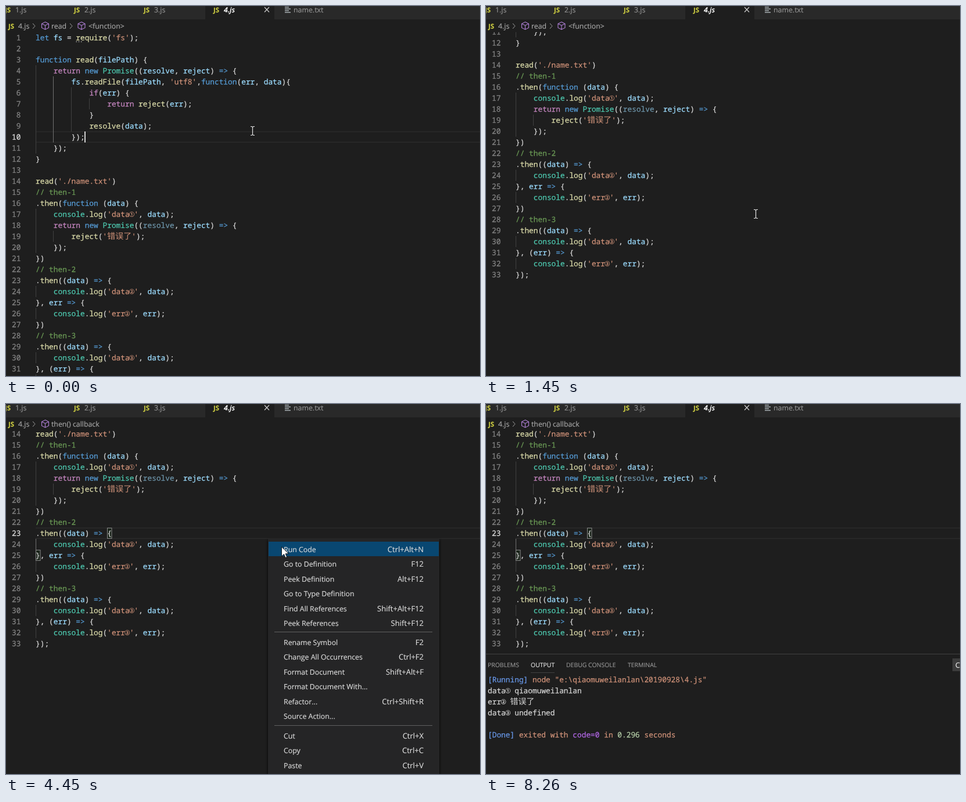
An HTML page for the animation above (8520 ms loop, 816 px wide and 637 px high).

```html
<!DOCTYPE html>
<html lang="en">
<head>
<meta charset="utf-8">
<title>Promise chain in an editor</title>
<style>
html, body { margin: 0; width: 100%; height: 100%; overflow: hidden; background: #1e1e1e; }
svg { display: block; width: 100vw; height: 100vh; }
text { white-space: pre; text-rendering: geometricPrecision; fill: currentColor; stroke: currentColor; stroke-width: .15; }
.code { font: 12.83px 'Noto Sans Mono', 'DejaVu Sans Mono', monospace; stroke-width: .25; }
.cjk { font: 14px 'Noto Sans CJK SC', 'Noto Sans CJK', sans-serif; stroke-width: 0; }
.ring { font: 9px 'Noto Sans CJK SC', 'Noto Sans CJK', sans-serif; text-anchor: middle; stroke-width: .4; }
.ui { font: 12.35px 'Open Sans', 'Noto Sans', sans-serif; }
.keys { font: 13px 'Open Sans', 'Noto Sans', sans-serif; }
.cap { font: 10.45px 'Open Sans', 'Noto Sans', sans-serif; }
.js { font: bold 11.5px 'Open Sans', 'Noto Sans', sans-serif; }
.active { font-style: italic; font-weight: 600; }
.end { text-anchor: end; }
</style>
</head>
<body>
<svg id="stage" viewBox="0 0 816 637" preserveAspectRatio="none"></svg>
<script>
const LOOP = 8520, CELL = 7.7, HAN = 14, ROW = 19, LEFT = 51, TOP = 45;

const source = `let fs = require('fs');

function read(filePath) {
    return new Promise((resolve, reject) => {
        fs.readFile(filePath, 'utf8',function(err, data){
            if(err) {
                return reject(err);
            }
            resolve(data);
        });
    });
}

read('./name.txt')
// then-1
.then(function (data) {
    console.log('data①', data);
    return new Promise((resolve, reject) => {
        reject('错误了');
    });
})
// then-2
.then((data) => {
    console.log('data②', data);
}, err => {
    console.log('err②', err);
})
// then-3
.then((data) => {
    console.log('data③', data);
}, (err) => {
    console.log('err③', err);
});`.split('\n');

const TOKEN = /(\/\/.*)|('[^']*')|(=>|\b(?:let|function|new)\b)|\b(return|if)\b|\b(Promise|console)\b|(\w+)(?=\()|(\w+)|([^\s\w'=]+|.)/g;
const COLORS = ['#6a9955', '#ce9178', '#569cd6', '#c586c0', '#4ec9b0', '#dcdcaa', '#9cdcfe', '#d4d4d4'];

const escapeXml = s => s.replace(/&/g, '&amp;').replace(/</g, '&lt;').replace(/>/g, '&gt;');
const label = (x, y, s, cls, color, more = '') =>
  `<text x="${x}" y="${y}" class="${cls}" color="${color}" ${more}>${escapeXml(s)}</text>`;
const rect = (x, y, w, h, fill, more = '') =>
  `<rect x="${x}" y="${y}" width="${w}" height="${h}" fill="${fill}" ${more}/>`;
const path = (d, stroke, more = '') => `<path d="${d}" fill="none" stroke="${stroke}" ${more}/>`;
const group = (id, body) => `<g id="${id}">${body}</g>`;

const rowTop = n => TOP + (n - 1) * ROW;

// Monospaced text; ringed digits take one cell, Han characters 14px.
function mono(x, y, parts) {
  let out = '';
  for (const [str, color, more] of parts) {
    for (const s of str.match(/[①-③]|[\u4e00-\u9fff]+|[^①-③\u4e00-\u9fff]+/g)) {
      if (/[①-③]/.test(s)) {
        out += label(x + CELL / 2, y - 1, s, 'ring', color);
        x += CELL;
      } else if (/[\u4e00-\u9fff]/.test(s)) {
        out += label(x, y, s, 'cjk', color);
        x += HAN * s.length;
      } else {
        if (s.trim()) out += label(x, y, s, 'code', color, more);
        x += CELL * s.length;
      }
    }
  }
  return out;
}

function highlight(line, n) {
  return [...line.matchAll(TOKEN)].map(m => {
    const kind = m.slice(1).findIndex(g => g !== undefined);
    const unused = n === 18 && m[0] === 'resolve';
    return [m[0], COLORS[kind], unused ? 'opacity=".62"' : ''];
  });
}

function guides() {
  const runs = [[0, 4, 11], [1, 5, 10], [2, 6, 9], [3, 7, 7], [0, 17, 20], [1, 19, 19],
    [0, 24, 24], [0, 26, 26], [0, 30, 30], [0, 32, 32]];
  return runs.map(([level, a, b]) =>
    rect(Math.floor(LEFT + level * 4 * CELL), rowTop(a), 1, (b - a + 1) * ROW, '#404040', `id="guide${a}"`)).join('');
}

function editor() {
  const text = source.map((line, i) => {
    const y = rowTop(i + 1) + 14;
    return label(25.5, y, String(i + 1), 'code end', '#858585', `id="num${i + 1}"`) +
      mono(LEFT, y, highlight(line, i + 1));
  }).join('');
  const bracket = (x, n) =>
    rect(x + .5, rowTop(n) + .5, 7.5, 18, '#006400', 'fill-opacity=".1" stroke="#888"');
  return group('current', path('M51 .5H816M51 18.5H816', '#2b2b2b', 'stroke-width="1.6"')) +
    guides() +
    group('brackets', bracket(174, 23) + bracket(51, 25)) +
    text +
    path('M120.5 61.5h11', '#a8a8a8', 'stroke-width="1.5" stroke-dasharray="1.6 2.6"') +
    rect(0, 0, 2, ROW, '#d0d0d0', 'id="caret"');
}

function header() {
  const yellow = '#cbcb41', dim = '#969696', crumb = '#a9a9a9';
  const cube = x => path(`M${x} 27.5l6 3v7l-6 3l-6-3v-7zm-6 3l6 3l6-3m-6 3v7`, '#b180d7', 'stroke-width="1.1"');
  const chevron = x => path(`M${x - 2} 30l4 4.5l-4 4.5`, '#a0a0a0');
  const tab = (x, name) => label(x, 10.5, 'JS', 'js', yellow) + label(x + 18, 11, name, 'ui', dim);
  return rect(0, 0, 816, TOP, '#1e1e1e') +
    rect(0, 0, 816, 23, '#292929') + rect(343, 0, 119, 23, '#1e1e1e') +
    tab(-2, '1.js') + tab(117, '2.js') + tab(237, '3.js') +
    label(357, 10.5, 'JS', 'js', yellow) + label(375, 11, '4.js', 'ui active', '#fff') +
    path('M445 2l8 8.5m0-8.5l-8 8.5', '#d0d0d0', 'stroke-width="1.2"') +
    path('M480 2h7M480 5h10M480 8h7M480 11h10', '#a8b0b4', 'stroke-width="1.3"') +
    label(495, 11, 'name.txt', 'ui', dim) +
    label(4, 38.5, 'JS', 'js', yellow) + label(21, 39, '4.js', 'ui', crumb) +
    chevron(48) + cube(67.5) +
    group('crumbRead', label(78, 39, 'read', 'ui', crumb) + chevron(112) + cube(130) +
      label(142, 39, '<function>', 'ui', crumb)) +
    group('crumbThen', label(78, 39, 'then() callback', 'ui', crumb));
}

function panel() {
  const blue = '#6796e6', rust = '#ce9178', plain = '#d4d4d4';
  const row = (i, parts) => mono(3, 479 + i * ROW, parts);
  const tabs = [[3, 'PROBLEMS'], [77, 'OUTPUT'], [138, 'DEBUG CONSOLE'], [244, 'TERMINAL']];
  return rect(0, 430, 816, 207, '#1e1e1e') + rect(0, 430, 816, 1, '#414141') +
    tabs.map(([x, s]) => label(x, 453, s, 'cap', s === 'OUTPUT' ? '#e7e7e7' : '#979797')).join('') +
    rect(77, 462, 41, 1, '#414141') +
    rect(803, 438, 13, 22, '#3c3c3c') + label(808, 454, 'C', 'ui', '#f0f0f0') +
    row(0, [['[Running]', blue], [' node "e:\\qiaomuweilanlan\\20190928\\4.js"', rust]]) +
    group('result', row(1, [['data① qiaomuweilanlan', plain]]) +
      row(2, [['err② 错误了', plain]]) + row(3, [['data③ undefined', plain]])) +
    group('donePlain', row(5, [['[Done] exited with code=0 in 0.296 seconds', plain]])) +
    group('doneColor', row(5, [['[Done]', blue], [' exited with ', rust], ['code=0', '#b267e6'],
      [' in ', rust], ['0.296', '#b5cea8'], [' seconds', rust]]));
}

function menu() {
  const groups = [
    [250.5, 'Run Code|Ctrl+Alt+N', 'Go to Definition|F12', 'Peek Definition|Alt+F12', 'Go to Type Definition|',
      'Find All References|Shift+Alt+F12', 'Peek References|Shift+F12'],
    [410.5, 'Rename Symbol|F2', 'Change All Occurrences|Ctrl+F2', 'Format Document|Shift+Alt+F',
      'Format Document With...|', 'Refactor...|Ctrl+Shift+R', 'Source Action...|'],
    [571.5, 'Cut|Ctrl+X', 'Copy|Ctrl+C', 'Paste|Ctrl+V']
  ];
  const items = groups.map(([y, ...names]) => names.map((item, i) => {
    const [name, keys] = item.split('|'), base = y + 4.5 + i * 25.4;
    return label(478, base, name, 'ui', '#dcdcdc') + label(719, base, keys, 'keys end', '#dcdcdc');
  }).join('')).join('');
  return rect(451, 232, 295, 420, '#252526', 'style="filter:drop-shadow(0 2px 2px #000)"') +
    rect(452, 237, 293, 25, '#094771', 'id="hover"') +
    rect(462, 392, 272, 1, '#606060') + rect(462, 553, 272, 1, '#606060') + items;
}

const stage = document.getElementById('stage');
stage.innerHTML = rect(0, 0, 816, 637, '#1e1e1e') +
  group('editor', editor()) + header() + group('panel', panel()) + group('menu', menu()) +
  group('beam', path('M-3.5-7.5H-1.5L0-6.5L1.5-7.5H3.5M0-6.5V6.5M-3.5 7.5H-1.5L0 6.5L1.5 7.5H3.5', '#e6e6e6', 'stroke-width="1.2"')) +
  group('arrow', '<path d="M0 0V16L4 12.5L6.5 18.5L9 17.5L6.6 11.7H12Z" fill="#fff" stroke="#000" stroke-width=".8"/>');

const $ = id => document.getElementById(id);
const show = (id, on) => $(id).setAttribute('visibility', on ? 'inherit' : 'hidden');
const move = (id, x, y) => $(id).setAttribute('transform', `translate(${x} ${y})`);
const latest = (keys, t) => keys.filter(k => k[0] <= t).pop();

const scrolls = [[0, 0], [930, 50], [1050, 100], [1170, 150], [1320, 200], [2720, 250]];
const pointer = [
  [0, 424, 215], [260, 431, 240], [380, 450, 306], [500, 464, 357], [660, 464, 358],
  [3120, 460, 328], [3240, 455, 292], [3390, 454, 260], [3540, 454, 240], [3660, 454, 230],
  [4210, 460, 236], [4330, 470, 243], [4450, 474.5, 246], [4730, 476, 247],
  [7290, 498, 263], [7440, 570, 338], [7560, 658, 426], [7710, 744, 505], [7830, 804, 559],
  [7990, 805, 595], [8140, 805, 627]
];
const caretFlips = [0, 380, 930, 4090, 4730, 5300, 5740, 6330, 6730, 7290, 7830, 8260];

function render(t) {
  const clicked = t >= 3970, menuOpen = t >= 4090 && t < 4730;
  const line = clicked ? 23 : 10;
  move('editor', 0, -latest(scrolls, t)[1]);
  move('current', 0, rowTop(line));
  move('caret', clicked ? 181 : 135, rowTop(line));
  show('caret', caretFlips.filter(f => f <= t).length % 2);
  show('brackets', clicked);
  for (const n of [10, 23]) $('num' + n).setAttribute('color', n === line ? '#e0e0e0' : '#858585');
  $('guide5').setAttribute('fill', clicked ? '#404040' : '#707070');
  $('guide24').setAttribute('fill', clicked ? '#707070' : '#404040');
  show('crumbRead', !clicked);
  show('crumbThen', clicked);

  show('menu', menuOpen);
  show('hover', t >= 4330);
  show('panel', t >= 4870);
  show('result', t >= 5300);
  show('donePlain', t >= 5300 && t < 5430);
  show('doneColor', t >= 5430);

  const [, x, y] = latest(pointer, t);
  move('beam', x + .5, y);
  move('arrow', x, y);
  show('beam', !menuOpen && t < 8260);
  show('arrow', menuOpen);
}

function tick() {
  render(performance.now() % LOOP);
  requestAnimationFrame(tick);
}
tick();
</script>
</body>
</html>
```
